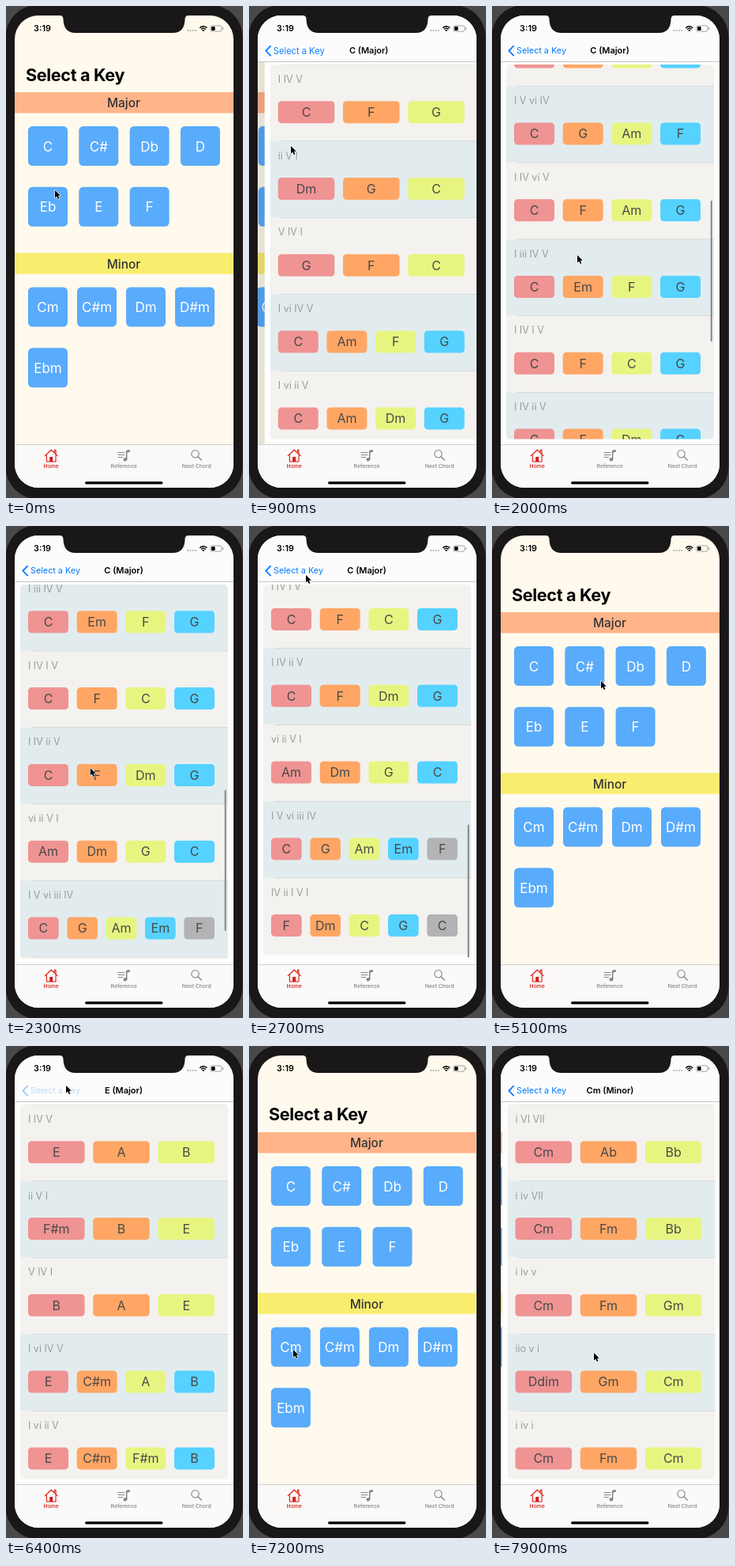
Write an HTML page with a canvas that moves like this. It is 300 px wide and 622 px high and loops after 8 s.

```html
<!DOCTYPE html>
<html lang="en">
<head>
<meta charset="utf-8">
<title>Chord progressions</title>
<style>
html, body { margin: 0; width: 100%; height: 100%; overflow: hidden; background: #4a494a; }
canvas { display: block; width: 300px; height: 622px; }
</style>
</head>
<body>
<canvas id="stage"></canvas>
<script>
const W = 300, H = 622, LOOP = 8000;
const canvas = document.getElementById('stage');
const ctx = canvas.getContext('2d');
const dpr = window.devicePixelRatio || 1;
canvas.width = W * dpr;
canvas.height = H * dpr;

const FONT = 'Inter, "Liberation Sans", sans-serif';
const SCREEN = { x: 11, y: 12, w: 277, h: 597 };
const LIST = { x: 18, y: 74, w: 263, h: 473.6 };
const ROW = 96.8;
const BLUE = '#007aff';
const CHIPS = ['#ef9393', '#ffa665', '#e7f580', '#55d2ff', '#b3b3b5'];

const MAJOR_ROWS = ['I IV V', 'ii V I', 'V IV I', 'I vi IV V', 'I vi ii V', 'I V vi IV',
  'I IV vi V', 'I iii IV V', 'I IV I V', 'I IV ii V', 'vi ii V I', 'I V vi iii IV', 'IV ii I V I'];
const MINOR_ROWS = ['i VI VII', 'i iv VII', 'i iv v', 'iio v i', 'i iv i'];

const PAGES = {
  c: { title: 'C (Major)', rows: MAJOR_ROWS,
    chords: { I: 'C', ii: 'Dm', iii: 'Em', IV: 'F', V: 'G', vi: 'Am' } },
  e: { title: 'E (Major)', rows: MAJOR_ROWS,
    chords: { I: 'E', ii: 'F#m', iii: 'G#m', IV: 'A', V: 'B', vi: 'C#m' } },
  cm: { title: 'Cm (Minor)', rows: MINOR_ROWS,
    chords: { i: 'Cm', iio: 'Ddim', iv: 'Fm', v: 'Gm', VI: 'Ab', VII: 'Bb' } }
};

// Navigation: start time, page, direction
const MOVES = [
  [460, 'c', 1], [4050, 'c', 0],
  [5520, 'e', 1], [6450, 'e', 0],
  [7290, 'cm', 1]
];
const SCROLL = [[1250, 0], [1600, 150], [2000, 456], [2300, 690], [2500, 792], [2700, 790.7], [3050, 784.8]];
const POINTER = [
  [0, 62, 233], [350, 53, 177], [950, 53, 177], [1450, 108, 315], [2250, 108, 315],
  [2700, 72, 62], [3000, 60, 51], [4350, 60, 51], [5100, 138, 196], [5400, 118, 252],
  [5650, 118, 252], [6300, 76, 50], [6600, 76, 50], [7150, 56, 384], [7400, 56, 384], [7900, 129, 388]
];

const lerp = (a, b, k) => a + (b - a) * k;
const clamp = (v) => Math.max(0, Math.min(1, v));
const smooth = (k) => k * k * (3 - 2 * k);
const ramp = (t, a, b) => clamp((t - a) / (b - a));

function track(keys, t, i, ease) {
  if (t <= keys[0][0]) return keys[0][i];
  for (let n = 1; n < keys.length; n++) {
    const a = keys[n - 1], b = keys[n];
    if (t <= b[0]) return lerp(a[i], b[i], ease((t - a[0]) / (b[0] - a[0])));
  }
  return keys[keys.length - 1][i];
}

function navState(t) {
  let page = null, p = 0;
  for (const [start, id, dir] of MOVES) {
    if (t < start) break;
    const k = (t - start) * 0.012;
    let rest = (1 + k) * Math.exp(-k);
    if (rest < 0.001) rest = 0;
    page = PAGES[id];
    p = dir ? 1 - rest : rest;
  }
  return { page, p };
}

function rect(x, y, w, h, color) {
  ctx.fillStyle = color;
  ctx.fillRect(x, y, w, h);
}

function round(x, y, w, h, r) {
  ctx.beginPath();
  ctx.roundRect(x, y, w, h, r);
}

function box(x, y, w, h, r, color) {
  round(x, y, w, h, r);
  ctx.fillStyle = color;
  ctx.fill();
}

function line(points, color, width) {
  ctx.beginPath();
  points.forEach(([x, y], i) => i ? ctx.lineTo(x, y) : ctx.moveTo(x, y));
  ctx.strokeStyle = color;
  ctx.lineWidth = width;
  ctx.stroke();
}

function text(s, x, y, size, color, weight = 400, align = 'center', spacing = 0) {
  ctx.font = `${weight} ${size}px ${FONT}`;
  ctx.letterSpacing = spacing + 'px';
  ctx.textAlign = align;
  ctx.fillStyle = color;
  ctx.fillText(s, x, y);
}

function layer(alpha, draw) {
  if (alpha <= 0) return;
  ctx.save();
  ctx.globalAlpha *= alpha;
  draw();
  ctx.restore();
}

function keys(names, stride, top) {
  names.forEach((name, i) => {
    const x = 28 + (i % 4) * stride, y = top + Math.floor(i / 4) * 76.8;
    box(x, y, 50, 50, 5.5, '#59abfb');
    text(name, x + 25, y + 31.5, 17, '#fff');
  });
}

function drawHome() {
  rect(11, 12, 277, 597, '#fffaed');
  rect(11, 109, 277, 26.4, '#ffb48a');
  text('Major', 149, 128, 15.4, '#333', 500);
  keys(['C', 'C#', 'Db', 'D', 'Eb', 'E', 'F'], 64.3, 152);
  rect(11, 312.3, 277, 26.4, '#f9ed70');
  text('Minor', 149, 331.5, 15.4, '#333', 500);
  keys(['Cm', 'C#m', 'Dm', 'D#m', 'Ebm'], 62, 355.5);
}

function drawRow(page, i, y) {
  rect(LIST.x, y, LIST.w, ROW, i % 2 ? '#e2ecee' : '#f4f2ef');
  rect(32, y - 0.35, LIST.x + LIST.w - 32, 0.7, '#cdcdcd');
  const label = page.rows[i];
  text(label, 28, y + 22.8, 12.5, '#9c9c9c', 400, 'left');
  const parts = label.split(' ');
  const stride = 246.7 / parts.length, w = stride - 10.7;
  parts.forEach((degree, n) => {
    const x = 28 + n * stride;
    box(x, y + 46.2, w, 28, 4.5, CHIPS[n]);
    text(page.chords[degree], x + w / 2, y + 66, 16, '#484848');
  });
}

function drawPage(page, scroll, bar) {
  rect(11, 12, 277, 597, '#fdfdfd');
  ctx.save();
  round(LIST.x, LIST.y, LIST.w, LIST.h, 5);
  ctx.clip();
  page.rows.forEach((_, i) => {
    const y = LIST.y + i * ROW - scroll;
    if (y < LIST.y + LIST.h && y + ROW > LIST.y) drawRow(page, i, y);
  });
  ctx.restore();
  layer(bar, () => {
    const total = page.rows.length * ROW;
    const len = LIST.h * LIST.h / total;
    const over = Math.max(0, scroll - (total - LIST.h));
    const y = LIST.y + scroll / total * LIST.h;
    const end = Math.min(y + len, LIST.y + LIST.h - 2);
    box(276.7, y + over, 2, end - y - over, 1, '#858585');
  });
}

function drawNav(page, p, pressed) {
  layer(p, () => {
    rect(11, 12, 277, 58.3, '#fcfcfc');
    rect(11, 70, 277, 0.8, '#bcbcbc');
  });
  // The large heading shrinks into the back label
  layer(clamp(1 - p * 1.6), () => {
    text('Select a Key', lerp(25, 31, p), lerp(94.5, 60, p), lerp(21.6, 10.8, p),
      '#000', 700, 'left', -0.35 * (1 - p));
  });
  if (!page) return;
  const faded = lerp(1, 0.25, pressed);
  layer(clamp(p * 1.6 - 0.6) * faded, () => {
    text('Select a Key', lerp(25, 31, p), lerp(94.5, 60, p), lerp(21.6, 10.8, p), BLUE, 400, 'left');
  });
  layer(p * lerp(1, 0.4, pressed), () => {
    ctx.lineCap = 'round';
    line([[27.2, 50.6], [21.4, 56.6], [27.2, 62.6]], BLUE, 1.8);
  });
  layer(p, () => text(page.title, 149 + (1 - p) * 85, 60, 11, '#000', 600));
}

function drawTabs() {
  rect(11, 554.5, 277, 54.5, 'rgba(250,250,250,.88)');
  rect(11, 554.2, 277, 0.7, '#c2c2c2');
  const red = '#de1812', gray = '#858585';
  ctx.lineJoin = 'round';
  ctx.lineCap = 'round';

  line([[61.3, 564], [61.3, 561.3], [63, 561.3], [63, 566]], red, 1.1);
  line([[49.3, 568.6], [57.2, 561.2], [65.2, 568.6]], red, 1.2);
  line([[51.4, 567.6], [51.4, 576], [63, 576], [63, 567.6]], red, 1.1);
  rect(55.2, 570, 4, 6, red);
  text('Home', 57.2, 584.2, 6.8, red, 500);

  [564.5, 567.5, 570.5].forEach((y, i) => line([[142, y], [i === 2 ? 147.5 : 150, y]], gray, 1));
  line([[152.7, 573], [152.7, 562.6], [156.4, 561.7]], gray, 1.5);
  line([[152.7, 564], [156.4, 563]], gray, 1.5);
  ctx.fillStyle = gray;
  ctx.beginPath();
  ctx.ellipse(150.9, 573.2, 2.5, 2.1, -0.3, 0, 7);
  ctx.fill();
  text('Reference', 149.2, 584.2, 6.8, gray, 500);

  ctx.beginPath();
  ctx.arc(239.5, 566.2, 4.7, 0, 7);
  ctx.lineWidth = 1.1;
  ctx.stroke();
  line([[243, 569.7], [247.3, 574]], gray, 1.4);
  text('Next Chord', 241.2, 584.2, 6.8, gray, 500);

  box(100, 601.2, 98.5, 3.2, 1.6, '#000');
}

function drawStatus() {
  text('3:19', 46, 32.2, 10.8, '#000', 600);
  ctx.fillStyle = '#a9a9a5';
  for (let i = 0; i < 4; i++) {
    ctx.beginPath();
    ctx.arc(230.3 + i * 3.2, 31, 1.05, 0, 7);
    ctx.fill();
  }
  ctx.strokeStyle = '#000';
  ctx.lineCap = 'butt';
  ctx.lineWidth = 1.5;
  [6.2, 3.8].forEach((r) => {
    ctx.beginPath();
    ctx.arc(249.8, 32, r, -Math.PI * 0.76, -Math.PI * 0.24);
    ctx.stroke();
  });
  ctx.fillStyle = '#000';
  ctx.beginPath();
  ctx.moveTo(249.8, 32.3);
  ctx.arc(249.8, 32, 2.2, -Math.PI * 0.76, -Math.PI * 0.24);
  ctx.fill();
  round(258.8, 24.9, 14.2, 7.2, 2);
  ctx.strokeStyle = '#8c8c8a';
  ctx.lineWidth = 0.8;
  ctx.stroke();
  box(260, 26.1, 4.6, 4.8, 1, '#000');
  box(274, 27.2, 1.1, 2.6, 0.5, '#8c8c8a');
}

function drawNotch() {
  ctx.fillStyle = '#1a1718';
  ctx.beginPath();
  ctx.moveTo(68, 11);
  ctx.lineTo(68, 12);
  ctx.quadraticCurveTo(72.5, 12, 72.5, 17);
  ctx.quadraticCurveTo(73, 34, 88, 34);
  ctx.lineTo(211, 34);
  ctx.quadraticCurveTo(226, 34, 226.5, 17);
  ctx.quadraticCurveTo(226.5, 12, 231, 12);
  ctx.lineTo(231, 11);
  ctx.fill();
}

function drawPointer(x, y) {
  ctx.save();
  ctx.translate(x, y);
  ctx.beginPath();
  [[0, 0], [0, 9.4], [2.2, 7.4], [3.8, 11], [5.4, 10.3], [3.9, 6.8], [6.8, 6.7]]
    .forEach(([a, b]) => ctx.lineTo(a, b));
  ctx.closePath();
  ctx.lineJoin = 'round';
  ctx.strokeStyle = '#fff';
  ctx.lineWidth = 1.3;
  ctx.stroke();
  ctx.fillStyle = '#000';
  ctx.fill();
  ctx.restore();
}

function draw(t) {
  ctx.setTransform(dpr, 0, 0, dpr, 0, 0);
  rect(0, 0, W, H, '#4a494a');
  box(-0.5, -1, 300, 624, 40, '#1a1718');

  const { page, p } = navState(t);
  const scroll = page === PAGES.c ? track(SCROLL, t, 1, (k) => k) : 0;
  const bar = ramp(t, 1250, 1350) * (1 - ramp(t, 3150, 3400));
  const pressed = Math.max(
    ramp(t, 3900, 4000) * (1 - ramp(t, 4100, 4300)),
    ramp(t, 6320, 6390) * (1 - ramp(t, 6520, 6720)));

  ctx.save();
  round(SCREEN.x, SCREEN.y, SCREEN.w, SCREEN.h, 30);
  ctx.clip();
  if (p < 1) {
    ctx.save();
    ctx.translate(-83 * p, 0);
    drawHome();
    ctx.restore();
    if (p > 0) {
      rect(SCREEN.x, 12, 277, 97, `rgba(255,250,237,${p})`);
      rect(SCREEN.x, 12, 277, 597, `rgba(0,0,0,${0.1 * p})`);
    }
  }
  if (p > 0) {
    ctx.save();
    ctx.translate(SCREEN.w * (1 - p), 0);
    drawPage(page, scroll, bar);
    ctx.restore();
  }
  drawNav(page, p, pressed);
  drawTabs();
  drawStatus();
  ctx.restore();

  drawNotch();
  drawPointer(track(POINTER, t, 1, smooth), track(POINTER, t, 2, smooth));
}

const begin = performance.now();
function tick() {
  draw((performance.now() - begin) % LOOP);
  requestAnimationFrame(tick);
}
tick();
</script>
</body>
</html>
```
